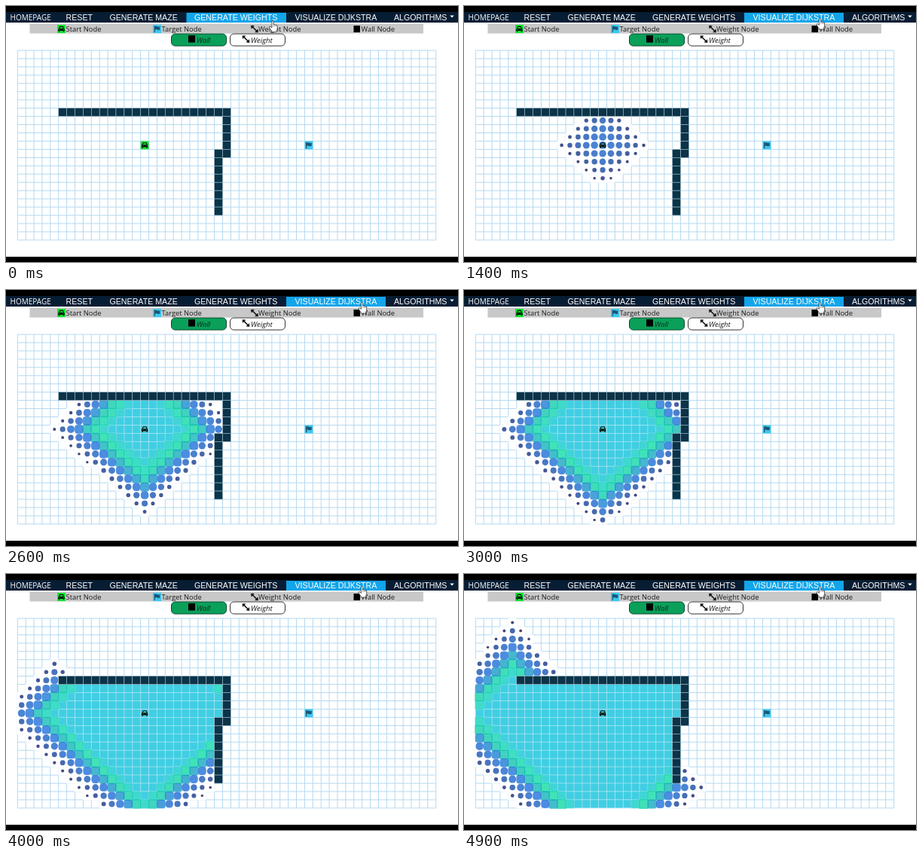
These frames come from a looping animation (600 by 340 pixels, 5 s). An HTML page:

```html
<!DOCTYPE html>
<html lang="en">
<head>
<meta charset="utf-8">
<title>Pathfinding grid</title>
<style>
html, body { margin: 0; width: 100%; height: 100%; overflow: hidden; background: #fff; }
svg { display: block; width: 600px; height: 340px; }
.nav { font: 10.65px "Liberation Sans", Arial, sans-serif; fill: #fff; }
.home { font: 10px "Open Sans", sans-serif; fill: #fff; }
.legend { font: 9.4px "Open Sans", sans-serif; fill: #1c1c1c; }
.button { font: italic 9.6px "Open Sans", sans-serif; }
</style>
</head>
<body>
<svg id="stage" viewBox="0 0 600 340" xmlns="http://www.w3.org/2000/svg">
  <defs>
    <g id="car">
      <path d="M-4.2 .2 L-3.6 -.6 L-2.7 -3.2 Q-2.5 -3.8 -1.8 -3.8 H1.8 Q2.5 -3.8 2.7 -3.2 L3.6 -.6 L4.2 .2 V2.6 H3.7 V3.7 H2.2 V2.6 H-2.2 V3.7 H-3.7 V2.6 H-4.2 Z M-2.3 -.8 H2.3 L1.7 -2.6 H-1.7 Z" fill="#081410" fill-rule="evenodd"/>
      <path d="M-3 .8 h1.2 M1.8 .8 h1.2" stroke="#3a9a70" stroke-width=".9"/>
    </g>
    <g id="flag">
      <path d="M-3.2 -4 V4.2" stroke="#123a55" stroke-width="1"/>
      <path d="M-2.7 -3.4 Q-1 -4.2 .6 -3.3 T3.8 -3.4 V.9 Q2 1.8 .4 1 T-2.7 1.1 Z" fill="#1a5475"/>
    </g>
    <g id="weight" stroke="#111" fill="#111">
      <path d="M-3 -3 L3 3" stroke-width="1.6"/>
      <path d="M-4.6 -4.4 L-.6 -4.2 L-4.2 -.6 Z M4.6 4.4 L.6 4.2 L4.2 .6 Z" stroke-width=".5"/>
    </g>
  </defs>

  <rect width="600" height="340" fill="#fff"/>
  <rect width="600" height="8.5" fill="#000"/>
  <rect y="8" width="600" height="14" fill="#071d33"/>
  <rect y="333" width="600" height="7" fill="#000"/>
  <rect id="hover" y="9" height="13" fill="#12a5ea"/>
  <text class="home" x="5.5" y="19.4">HOMEPAGE</text>
  <g class="nav">
    <text x="79.5" y="19.3">RESET</text>
    <text x="137.5" y="19.3">GENERATE MAZE</text>
    <text x="250" y="19.3">GENERATE WEIGHTS</text>
    <text x="383.5" y="19.3">VISUALIZE DIJKSTRA</text>
    <text x="515" y="19.3">ALGORITHMS</text>
    <path d="M589.3 12.5 h5.4 l-2.7 3 z"/>
  </g>

  <rect x="31.5" y="23.5" width="522.5" height="13" fill="#c8c8c8"/>
  <rect x="68" y="25" width="11" height="11" fill="#14e632"/>
  <use href="#car" x="73.5" y="30.5"/>
  <rect x="195" y="25" width="11" height="11" fill="#3cc8ee"/>
  <use href="#flag" x="200.5" y="30.5"/>
  <use href="#weight" x="330" y="30.5"/>
  <rect x="461.5" y="26" width="8.5" height="9" fill="#000"/>
  <g class="legend">
    <text x="79.5" y="33.8">Start Node</text>
    <text x="206.5" y="33.8">Target Node</text>
    <text x="335" y="33.8">Weight Node</text>
    <text x="471.5" y="33.8">Wall Node</text>
  </g>

  <g class="button" stroke-width="1">
    <rect x="219.5" y="37" width="73" height="16" rx="5" fill="#0aa05a" stroke="#0b4a2c"/>
    <rect x="242" y="39" width="9" height="9.5" fill="#000"/>
    <text x="253" y="49.3" fill="#0a2a1a">Wall</text>
    <rect x="297.5" y="37" width="73" height="16" rx="5" fill="#fff" stroke="#333"/>
    <use href="#weight" x="318.5" y="44"/>
    <text x="325" y="49.3" fill="#1c1c1c">Weight</text>
  </g>

  <path id="grid" fill="none" stroke="#b4d9f2" stroke-width="1"/>
  <g id="blanks" fill="#fff"></g>
  <g id="dots" stroke-width=".8"></g>
  <g id="walls" fill="#0c3347" stroke="#9fbccb" stroke-width=".6"></g>
  <g id="nodes"></g>

  <g id="cursor">
    <path d="M-1.1 .9 Q0 -.6 1.1 .9 V5 Q2.2 4.3 2.9 5.4 Q4 4.8 4.6 5.9 Q6 5.6 6.2 7 V10 Q6 12 5 13.2 V15 H-1.3 V13.6 Q-3 11.6 -4.5 8.9 Q-4.6 7.4 -3 7.8 L-1.1 9.4 Z" fill="#fff" stroke="#222" stroke-width=".7"/>
    <path d="M1.1 5 V8 M2.9 5.6 V8 M4.6 6.2 V8" stroke="#555" stroke-width=".5"/>
  </g>
</svg>
<script>
const LOOP = 5000, STEP = 100, LIFE = 1500;
const COLS = 51, ROWS = 23, X0 = 15.3, Y0 = 59, CW = 10.89, CH = 10.95;
const START = { c: 15, r: 11 }, TARGET = { c: 35, r: 11 };
// Search pace: [time in ms, nodes visited]
const PACE = [[850, 0], [1400, 56], [2200, 143], [3000, 218], [3400, 261], [4000, 320], [4900, 407], [5000, 417]];
const COLORS = [[0, [0, 0, 66]], [.5, [17, 104, 217]], [.75, [0, 217, 159]], [1, [0, 190, 218]]];
const SCALES = [[0, [.3]], [.75, [1.2]], [1, [1]]];

const $ = id => document.getElementById(id);
const set = (el, attrs) => { for (const k in attrs) el.setAttribute(k, attrs[k]); return el; };
const add = (parent, tag, attrs) =>
  parent.appendChild(set(document.createElementNS("http://www.w3.org/2000/svg", tag), attrs));
const clamp = v => Math.min(1, Math.max(0, v));
const left = c => X0 + c * CW, top_ = r => Y0 + r * CH;
const box = (c, r) => ({ x: left(c), y: top_(r), width: CW, height: CH });

// cubic-bezier(0, 0, .58, 1)
function easeOut(x) {
  if (x <= 0 || x >= 1) return clamp(x);
  let lo = 0, hi = 1, s;
  for (let i = 0; i < 18; i++) {
    s = (lo + hi) / 2;
    if (1.74 * s * s * (1 - s) + s ** 3 < x) lo = s; else hi = s;
  }
  return 3 * s * s * (1 - s) + s ** 3;
}

function keyed(frames, p) {
  let i = 1;
  while (i < frames.length - 1 && p > frames[i][0]) i++;
  const [pa, a] = frames[i - 1], [pb, b] = frames[i];
  const e = easeOut((p - pa) / (pb - pa));
  return a.map((v, k) => v + (b[k] - v) * e);
}

function birthOf(index) {
  const n = index + .5;
  const i = PACE.findIndex(k => k[1] > n);
  if (i < 1) return Infinity;
  const [ta, na] = PACE[i - 1], [tb, nb] = PACE[i];
  return ta + (tb - ta) * (n - na) / (nb - na);
}

const isWall = (c, r) =>
  (r === 7 && c >= 5 && c <= 25) || (c === 25 && r >= 7 && r <= 12) || (c === 24 && r >= 12 && r <= 19);

// Breadth-first distances, visited row by row within one distance
function visitOrder() {
  const seen = new Set([START.r * COLS + START.c]);
  const queue = [{ ...START, d: 0 }];
  for (let i = 0; i < queue.length; i++) {
    const { c, r, d } = queue[i];
    for (const [dc, dr] of [[0, -1], [-1, 0], [1, 0], [0, 1]]) {
      const x = c + dc, y = r + dr, key = y * COLS + x;
      if (x < 0 || y < 0 || x >= COLS || y >= ROWS || seen.has(key) || isWall(x, y)) continue;
      seen.add(key);
      queue.push({ c: x, r: y, d: d + 1 });
    }
  }
  return queue.sort((a, b) => a.d - b.d || a.r - b.r || a.c - b.c);
}

let lines = "";
for (let c = 0; c <= COLS; c++) lines += `M${left(c)} ${Y0}V${top_(ROWS)}`;
for (let r = 0; r <= ROWS; r++) lines += `M${X0} ${top_(r)}H${left(COLS)}`;
set($("grid"), { d: lines });

for (let r = 0; r < ROWS; r++)
  for (let c = 0; c < COLS; c++)
    if (isWall(c, r)) add($("walls"), "rect", box(c, r));

const startBox = add($("nodes"), "rect", { ...box(START.c, START.r), fill: "#14e632" });
add($("nodes"), "rect", { ...box(TARGET.c, TARGET.r), fill: "#3cc8ee" });
for (const [id, n] of [["car", START], ["flag", TARGET]])
  add($("nodes"), "use", { href: "#" + id, x: left(n.c + .5), y: top_(n.r + .5) });

const cells = visitOrder().slice(0, PACE[PACE.length - 1][1]).map((n, i) => ({
  x: left(n.c + .5),
  y: top_(n.r + .5),
  birth: birthOf(i),
  blank: add($("blanks"), "rect", { x: left(n.c) - .5, y: top_(n.r) - .5, width: CW + 1, height: CH + 1 }),
  dot: add($("dots"), "rect", { stroke: "#d8f0fa" })
}));

function drawCell(cell, t) {
  const age = t - cell.birth, show = age >= 0 ? "inline" : "none";
  set(cell.blank, { display: show });
  set(cell.dot, { display: show });
  if (age < 0) return;
  const p = clamp(age / LIFE);
  const [scale] = keyed(SCALES, p);
  const w = CW * scale, h = CH * scale;
  const round = Math.min(.5, 1 - easeOut(p));
  set(cell.dot, {
    x: cell.x - w / 2, y: cell.y - h / 2, width: w, height: h,
    rx: w * round, ry: h * round,
    fill: `rgba(${keyed(COLORS, p).map(Math.round)},.75)`,
    "stroke-opacity": .5 * p * p
  });
}

function draw(t) {
  const m = clamp((t - 100) / 500), e = m * m * (3 - 2 * m);
  const x = 354 + 118.5 * e, y = 19.5 - 3.5 * e;
  set($("cursor"), { transform: `translate(${x} ${y})` });
  set($("hover"), x < 372 ? { x: 239.5, width: 132.5 } : { x: 372, width: 132 });
  set(startBox, { display: t < cells[0].birth ? "inline" : "none" });
  for (const cell of cells) drawCell(cell, t);
}

const began = performance.now();
let last = -1;
function tick() {
  const t = Math.floor((performance.now() - began) % LOOP / STEP) * STEP;
  if (t !== last) draw(last = t);
  requestAnimationFrame(tick);
}
tick();
</script>
</body>
</html>
```
